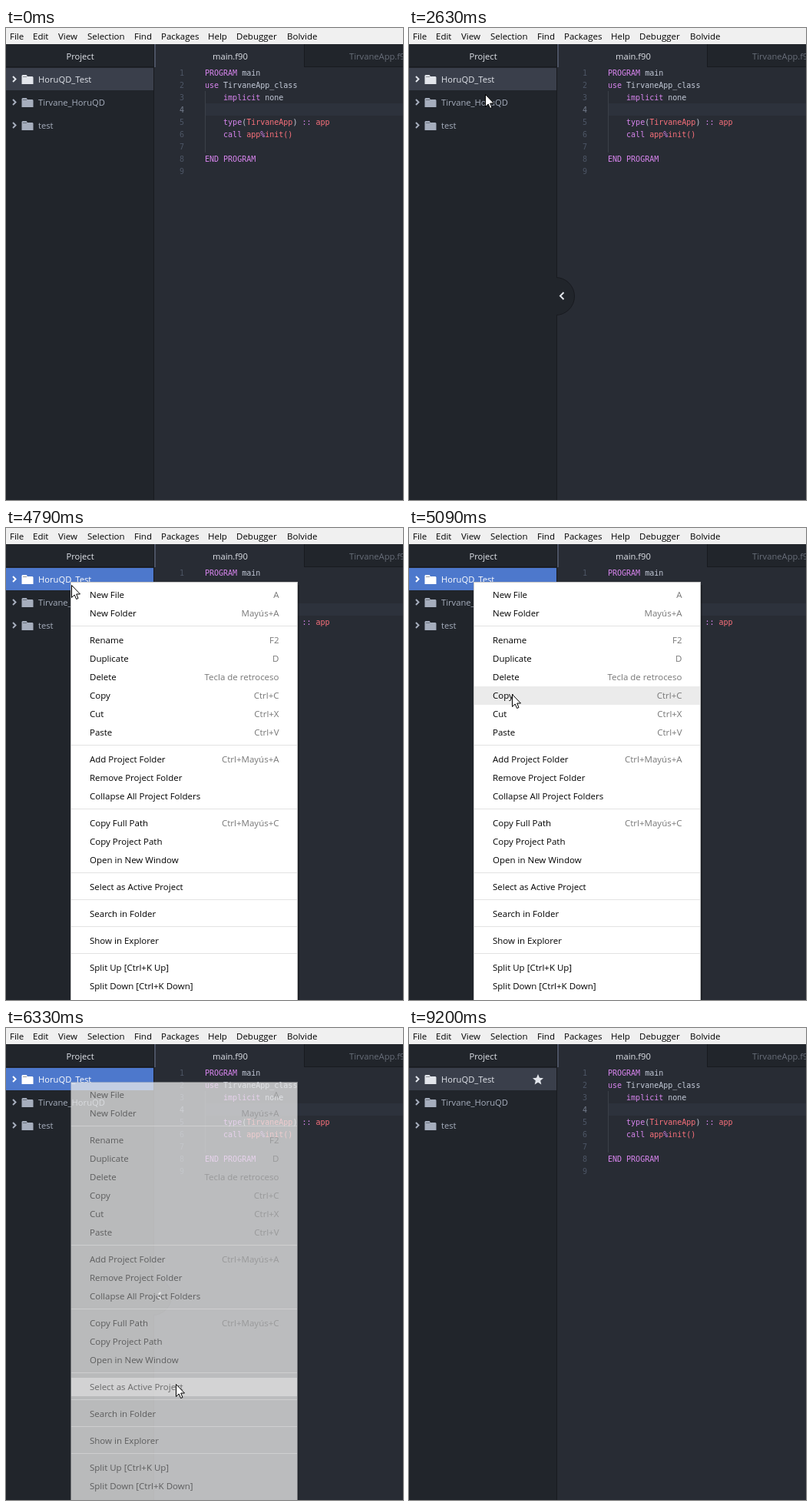
An HTML page with a canvas for the animation above (9.26 s loop, 517 px wide and 614 px high).

```html
<!DOCTYPE html>
<html lang="en">
<head>
<meta charset="utf-8">
<title>Editor: select active project</title>
<style>
html, body { margin: 0; width: 100%; height: 100%; overflow: hidden; background: #282c34; }
canvas { display: block; width: 517px; height: 614px; }
</style>
</head>
<body>
<canvas id="stage"></canvas>
<script>
const W = 517, H = 614, LOOP = 9260, STEP = 61;
const UI = '"Open Sans", "Noto Sans", sans-serif';
const MONO = '10px "DejaVu Sans Mono", monospace';
const BAR = '11.5px ' + UI, SIDE = '11.2px ' + UI;
const C = {
  panel: '#21252b', editor: '#282c34', edge: '#181a1f', bright: '#e2e5eb', soft: '#a6aebd',
  purple: '#d885ee', red: '#fa717b', plain: '#c3cad8'
};
const PROJECT = 'HoruQD_Test';

const canvas = document.getElementById('stage');
const ctx = canvas.getContext('2d');
const dpr = window.devicePixelRatio || 1;
canvas.width = W * dpr;
canvas.height = H * dpr;

const clamp = v => Math.max(0, Math.min(1, v));
const span = (t, a, b) => clamp((t - a) / (b - a));
const smooth = p => p * p * (3 - 2 * p);
const mix = (a, b, p) => a + (b - a) * p;
const snap = (t, start) => start + Math.floor((t - start) / STEP) * STEP;

function rect(x, y, w, h, color) {
  ctx.fillStyle = color;
  ctx.fillRect(x, y, w, h);
}

function text(str, x, y, font, color, align = 'left') {
  ctx.font = font;
  ctx.fillStyle = color;
  ctx.textAlign = align;
  ctx.fillText(str, x, y);
}

function shape(points, x, y, fill) {
  ctx.beginPath();
  points.forEach(([px, py]) => ctx.lineTo(x + px, y + py));
  ctx.closePath();
  ctx.fillStyle = fill;
  ctx.fill();
}

function chevron(x, y, dx, h, color) {
  ctx.beginPath();
  ctx.moveTo(x, y - h);
  ctx.lineTo(x + dx, y);
  ctx.lineTo(x, y + h);
  ctx.strokeStyle = color;
  ctx.lineWidth = 2;
  ctx.stroke();
}

const barItems = [['File', 5], ['Edit', 35], ['View', 68], ['Selection', 106], ['Find', 167],
  ['Packages', 202], ['Help', 263], ['Debugger', 300], ['Bolvide', 366]];

function drawMenuBar() {
  rect(0, 0, W, 21, '#f0f0f0');
  barItems.forEach(([name, x]) => text(name, x, 15, BAR, '#000'));
}

// Each line: indent, then pairs of text and colour.
const code = [
  [0, 'PROGRAM', C.purple, ' main', C.plain],
  [0, 'use', C.purple, ' TirvaneApp_class', C.plain],
  [4, 'implicit', C.purple, ' none', C.plain],
  [0],
  [4, 'type', C.purple, '(', C.plain, 'TirvaneApp', C.red, ')', C.plain, ' ::', C.purple, ' app', C.red],
  [4, 'call', C.purple, ' app', C.red, '%', C.purple, 'init()', C.red],
  [0],
  [0, 'END PROGRAM', C.purple],
  [0]
];
const CURSOR_LINE = 3;

function drawEditor() {
  rect(193, 21, W - 193, H - 21, C.editor);
  rect(388, 21, W - 388, 30, C.panel);
  rect(388, 21, 1, 30, C.edge);
  rect(388, 50, W - 388, 1, C.edge);
  rect(193, 21, 2, 30, '#4b5363');
  text('main.f90', 269, 41, SIDE, C.bright);
  text('TirvaneApp.f90', 447, 41, SIDE, '#686e79');
  rect(259, 98, W - 259, 16, '#2d323c');
  rect(259, 82, 1, 80, '#3b4048');
  code.forEach(([indent, ...parts], i) => {
    const y = 62 + i * 16;
    text(String(i + 1), 232, y, MONO, i === CURSOR_LINE ? '#747d8e' : '#4d5666', 'right');
    let x = 259 + indent * 6.02;
    for (let k = 0; k < parts.length; k += 2) {
      text(parts[k], x, y, MONO, parts[k + 1]);
      x += parts[k].length * 6.02;
    }
  });
}

function folder(y, color) {
  shape([[0, 0], [0, -11], [1, -12], [6, -12], [7, -11], [7, -10], [14, -10], [15, -9], [15, 0]],
    20.5, y + 6, color);
  rect(22, y - 4, 5, 1, 'rgba(33,37,43,.45)');
}

function star(x, y, color) {
  const points = Array.from({ length: 10 }, (_, i) => {
    const a = i * Math.PI / 5, r = i % 2 ? 3.3 : 7.4;
    return [Math.sin(a) * r, -Math.cos(a) * r];
  });
  shape(points, x, y, color);
}

function drawSidebar(t) {
  const focused = t >= 3800 && t < 9200;
  rect(0, 21, 193, H - 21, C.panel);
  text('Project', 96.5, 41, SIDE, C.bright, 'center');
  rect(0, 50, 192, 1, C.edge);
  rect(192, 21, 1, H - 21, C.edge);
  rect(0, 52, 192, 29, focused ? '#4d78cc' : '#3a3f4b');
  [PROJECT, 'Tirvane_HoruQD', 'test'].forEach((name, i) => {
    const y = 67 + i * 30;
    const color = i ? C.soft : focused ? '#fff' : C.bright;
    chevron(9, y - 0.5, 3.5, 3.5, color);
    folder(y, color);
    text(name, 42, y + 4, SIDE, color);
  });
  if (t >= 6640) star(168, 67.5, focused ? '#cbd6ef' : C.bright);
}

function drawHandle(t) {
  const show = span(snap(t, 2380), 2320, 2560) * (1 - span(snap(t, 7330), 7270, 7510));
  if (show <= 0) return;
  ctx.save();
  ctx.beginPath();
  ctx.rect(192, 300, 40, 100);
  ctx.clip();
  ctx.globalAlpha = show;
  ctx.translate(-12 * (1 - show), 0);
  ctx.beginPath();
  ctx.arc(191, 349, 24.5, 0, Math.PI * 2);
  ctx.fillStyle = C.panel;
  ctx.fill();
  ctx.strokeStyle = C.edge;
  ctx.lineWidth = 1;
  ctx.stroke();
  chevron(201.5, 348.5, -4.5, 4.5, C.bright);
  ctx.restore();
}

function drawTooltip(t) {
  if (t < 3250 || t >= 3980) return;
  const fadeIn = span(snap(t, 3250), 3190, 3430);
  const fadeOut = t < 3800 ? 1 : mix(1, 0.52, span(snap(t, 3800), 3740, 3920));
  ctx.save();
  ctx.globalAlpha = Math.min(fadeIn, fadeOut);
  rect(84, 90, 81, 20, '#767676');
  rect(85, 91, 79, 18, '#fff');
  text(PROJECT, 91, 104, SIDE, '#444');
  ctx.restore();
}

// Groups of menu rows, a separator between groups.
const groups = [
  [['New File', 'A'], ['New Folder', 'Mayús+A']],
  [['Rename', 'F2'], ['Duplicate', 'D'], ['Delete', 'Tecla de retroceso'],
    ['Copy', 'Ctrl+C'], ['Cut', 'Ctrl+X'], ['Paste', 'Ctrl+V']],
  [['Add Project Folder', 'Ctrl+Mayús+A'], ['Remove Project Folder'], ['Collapse All Project Folders']],
  [['Copy Full Path', 'Ctrl+Mayús+C'], ['Copy Project Path'], ['Open in New Window']],
  [['Select as Active Project']],
  [['Search in Folder']],
  [['Show in Explorer']],
  [['Split Up [Ctrl+K Up]'], ['Split Down [Ctrl+K Down]']]
];
const rows = [], rules = [];
let rowY = 87;
groups.forEach(group => {
  group.forEach(([label, key]) => {
    rows.push({ label, key, y: rowY });
    rowY += 24;
  });
  rules.push(rowY - 8);
  rowY += 11;
});
rules.pop();

function drawMenu(t, pos) {
  if (t < 3980 || t >= 6450) return;
  ctx.save();
  ctx.globalAlpha = t < 6330 ? 1 : 0.5;
  rect(380, 74, 2, H, 'rgba(0,0,0,.25)');
  rect(84, 70, 296, H, '#c4c4c4');
  rect(85, 71, 294, H, '#fff');
  const active = rows.filter(r => r.y - 12 <= pos[1]).pop();
  if (active) rect(85, active.y - 12, 294, 24, '#ebebeb');
  rules.forEach(y => rect(85, y, 294, 1, '#e3e3e3'));
  rows.forEach(({ label, key, y }) => {
    text(label, 109, y + 4, BAR, '#000');
    if (key) text(key, 355.5, y + 4, BAR, '#777', 'right');
  });
  ctx.restore();
}

function pointerAt(t) {
  if (t < 1540 || t >= 7710) return null;
  if (t < 2500) {
    const p = smooth(span(snap(t, 1540), 1540, 2440));
    return [mix(497, 130, p), mix(340, 74, p)];
  }
  if (t < 4790) {
    const p = span(snap(t, 2500), 2440, 2880), q = 1 - p;
    const bend = (a, b, c) => q * q * a + 2 * p * q * b + p * p * c;
    return [bend(130, 83, 84), bend(74, 100, 71)];
  }
  if (t < 7330) {
    const p = smooth(span(snap(t, 4790), 4760, 5426));
    return [mix(84, 221, p), mix(72, 463, p)];
  }
  const p = span(snap(t, 7330), 7270, 7650);
  return [mix(221, 511, p), mix(463, 480, p)];
}

const arrow = [[0.5, 0.5], [0.5, 16.5], [4.2, 13], [6.6, 18.5], [9, 17.5], [6.7, 12], [11.5, 12]];

function drawPointer([x, y]) {
  shape(arrow, Math.round(x), Math.round(y), '#fff');
  ctx.strokeStyle = '#000';
  ctx.lineWidth = 1;
  ctx.stroke();
}

function draw(t) {
  ctx.setTransform(dpr, 0, 0, dpr, 0, 0);
  const pos = pointerAt(t);
  drawEditor();
  drawSidebar(t);
  drawMenuBar();
  drawHandle(t);
  drawTooltip(t);
  drawMenu(t, pos);
  if (pos) drawPointer(pos);
}

const begin = performance.now();
function tick() {
  draw((performance.now() - begin) % LOOP);
  requestAnimationFrame(tick);
}
tick();
</script>
</body>
</html>
```
